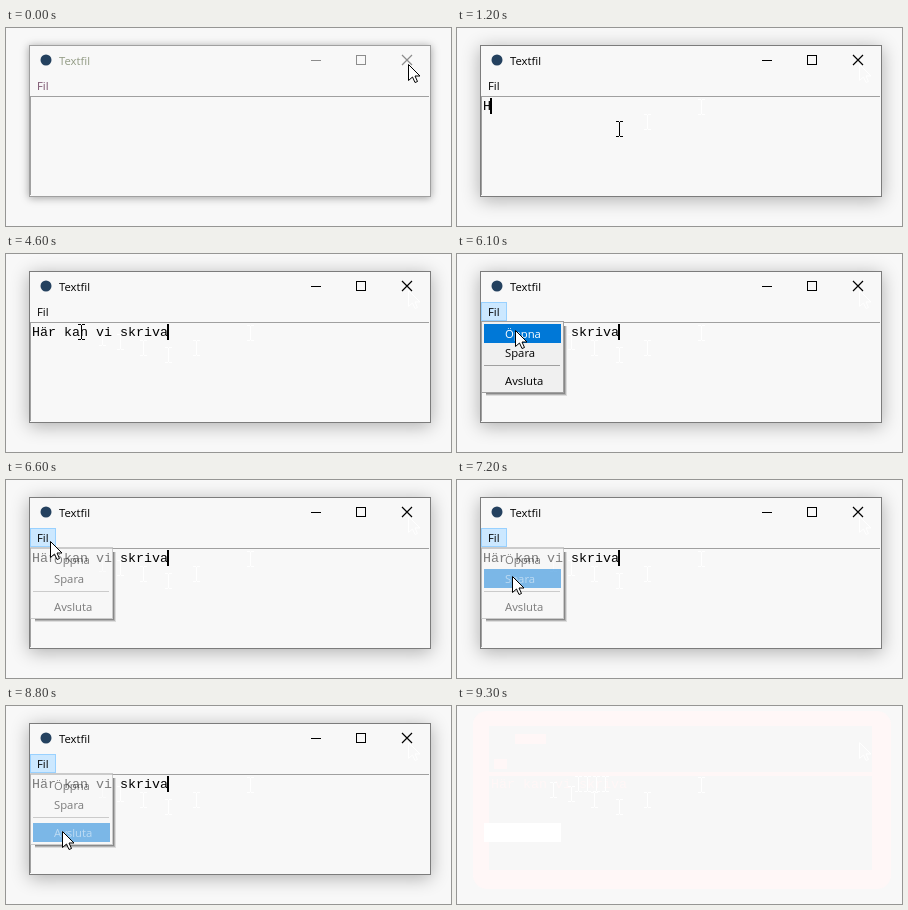
Animation of 445x198 px, one loop 9800 ms. Source, as an HTML page with a canvas:

```html
<!DOCTYPE html>
<html lang="sv">
<head>
<meta charset="utf-8">
<title>Textfil</title>
<style>
  html, body { margin: 0; width: 100%; height: 100%; overflow: hidden; background: #f8f8f8; }
  canvas { display: block; width: 445px; height: 198px; }
</style>
</head>
<body>
<canvas id="stage"></canvas>
<script>
const W = 445, H = 198, LOOP = 9800, STEP = 100;
const BG = '#f8f8f8', BLUE = '#0078d7', GREY = '#a0a0a0';
const UI = '11.3px "Open Sans", "Noto Sans", sans-serif';
const MONO = '13.33px "Courier New", "Liberation Mono", monospace';
const CELL = 8;

const TEXT = 'Här kan vi skriva';
const ITEMS = [['Öppna', 70], ['Spara', 89], ['Avsluta', 117]];

// The menu opens three times; each visit ends in a click
const VISITS = [
  { open: 5200, close: 6200 },
  { open: 6600, close: 7200 },
  { open: 7600, close: 8800 }
];
const CLOSE = 8800, GONE = 9300;

// Pointer glides: each starts where the last one ended
const FIL = { x: 45, y: 62 };
const GLIDES = [
  { from: 0, to: 400, x: 162, y: 101 },
  { from: 4100, to: 4600, x: 75, y: 78 },
  { from: 4600, to: 4900, ...FIL },
  { from: 5300, to: 5700, x: 59, y: 77 },
  { from: 6200, to: 6500, ...FIL },
  { from: 6700, to: 7000, x: 56, y: 97 },
  { from: 7200, to: 7500, ...FIL },
  { from: 7700, to: 8000, x: 51, y: 112 },
  { from: 8000, to: 8200, x: 57, y: 126 }
];

const canvas = document.getElementById('stage');
const ctx = canvas.getContext('2d');
const dpr = window.devicePixelRatio || 1;
canvas.width = W * dpr;
canvas.height = H * dpr;

const clamp = u => Math.min(1, Math.max(0, u));
const easeOut = u => 1 - (1 - u) ** 1.55;

function rect(x, y, w, h, fill) {
  ctx.fillStyle = fill;
  ctx.fillRect(x, y, w, h);
}

function frame(x, y, w, h, color) {
  ctx.strokeStyle = color;
  ctx.lineWidth = 1;
  ctx.strokeRect(x + .5, y + .5, w - 1, h - 1);
}

function label(s, x, y, color, font = UI) {
  ctx.font = font;
  ctx.fillStyle = color;
  ctx.fillText(s, x, y);
}

function pointerAt(t) {
  let x = 403, y = 37;
  for (const g of GLIDES) {
    const k = easeOut(clamp((t - g.from) / (g.to - g.from)));
    x += (g.x - x) * k;
    y += (g.y - y) * k;
  }
  return [Math.round(x), Math.round(y)];
}

// Half-transparent for one step when opening and closing
function menuAlpha(t) {
  const v = VISITS.find(v => t >= v.open && t < v.close + STEP);
  if (!v) return 0;
  return t < v.open + STEP || t >= v.close ? .5 : 1;
}

function typedCount(t) {
  const n = Math.ceil((t - 1190) / 144.3);
  return Math.min(TEXT.length, Math.max(0, n));
}

function caretOn(t) {
  const phase = (t - 1660) % 825;
  return t >= 900 && (phase < 0 || phase >= 300);
}

function arrow(x, y, fill, line) {
  const pts = [[0, 0], [0, 16], [4, 12.5], [6.5, 18], [9, 17], [6.5, 11.5], [11.5, 11.5]];
  ctx.beginPath();
  pts.forEach(([dx, dy]) => ctx.lineTo(x + dx - .5, y + dy - .5));
  ctx.closePath();
  ctx.fillStyle = fill;
  ctx.fill();
  ctx.strokeStyle = line;
  ctx.lineWidth = 1;
  ctx.stroke();
}

function beam(x, y, color) {
  rect(x, y - 7, 1, 14, color);
  for (const dy of [-8, 7]) {
    rect(x - 3, y + dy, 3, 1, color);
    rect(x + 1, y + dy, 3, 1, color);
  }
}

// Faint prints stay where the pointer has passed over the page
function drawPrints(t) {
  if (t >= STEP) arrow(403, 37, BG, '#fff');
  for (let s = 2 * STEP; s < Math.min(t, 4500); s += STEP) {
    const [x, y] = pointerAt(s);
    const [nx, ny] = pointerAt(s + STEP);
    if (x !== nx || y !== ny) beam(x, y, '#fff');
  }
}

function drawButtons(color) {
  rect(305, 32, 10, 1, color);
  frame(350, 27, 10, 10, color);
  ctx.beginPath();
  ctx.moveTo(396, 27);
  ctx.lineTo(406, 37);
  ctx.moveTo(406, 27);
  ctx.lineTo(396, 37);
  ctx.lineWidth = 1.2;
  ctx.stroke();
}

function drawWindow(t) {
  const active = t >= STEP;
  ctx.save();
  ctx.shadowColor = `rgba(0,0,0,${active ? .3 : .36})`;
  ctx.shadowBlur = (active ? 17 : 8) * dpr;
  ctx.shadowOffsetY = (active ? 3 : 1) * dpr;
  rect(23, 17, 402, 152, BG);
  ctx.restore();
  frame(23, 17, 402, 152, active ? '#7c7c7c' : GREY);

  ctx.beginPath();
  ctx.arc(40, 32, 5.5, 0, 7);
  ctx.fillStyle = '#24415f';
  ctx.fill();
  label('Textfil', 53, 37, active ? '#000' : '#929b84');
  drawButtons(active ? '#000' : '#8c8c8c');

  if (t >= 4800 && t <= CLOSE) {
    rect(24, 48, 26, 19, '#cce8ff');
    frame(24, 48, 26, 19, '#99d1ff');
  }
  label('Fil', 31, 62, active ? '#000' : '#79516c');
  rect(24, 68, 399, 1, GREY);
  rect(24, 68, 1, 99, GREY);
  drawPrints(t);

  const n = typedCount(t);
  for (let i = 0; i < n; i++) label(TEXT[i], 26 + i * CELL, 82, '#000', MONO);
  if (caretOn(t)) rect(25 + n * CELL, 70, 2, 16, '#000');
}

function drawMenu(t, y) {
  const alpha = menuAlpha(t);
  if (!alpha) return;
  for (let i = 0; i < 3; i++) {
    const shade = `rgba(0,0,0,${.45 - .17 * i})`;
    rect(107 + i, 72, 1, 68 + i, shade);
    rect(29, 139 + i, 78 + i, 1, shade);
  }
  ctx.globalAlpha = alpha;
  rect(24, 67, 83, 72, alpha < 1 ? BG : '#f0f0f0');
  frame(24, 67, 83, 72, GREY);
  const hot = ITEMS.filter(([, top]) => y >= top).length - 1;
  ITEMS.forEach(([name, top], i) => {
    if (i === hot) rect(27, top, 77, 19, BLUE);
    label(name, 48, top + 14, i === hot ? '#fff' : '#000');
  });
  rect(27, 111, 76, 1, GREY);
  ctx.globalAlpha = 1;
}

function drawPointer(t, x, y) {
  if (y > 68 && !menuAlpha(t)) beam(x, y, '#000');
  else arrow(x, y, '#fff', '#000');
}

// Pale afterimage of the closed window
function drawRemains() {
  const pink = '#fff7f7';
  ctx.beginPath();
  ctx.roundRect(16, 5, 418, 178, 14);
  ctx.fillStyle = pink;
  ctx.fill();
  rect(32, 20, 383, 144, '#f7f7f7');
  rect(32, 66, 383, 4, pink);
  rect(58, 28, 31, 10, pink);
  rect(37, 53, 13, 10, pink);
  label(TEXT, 34, 82, pink, MONO);
  for (let i = 0; i < 4; i++) beam(121 + i * 9, 78, '#fff');
  drawPrints(LOOP);
  rect(27, 117, 77, 19, '#fff');
}

function draw(t) {
  ctx.setTransform(dpr, 0, 0, dpr, 0, 0);
  rect(0, 0, W, H, BG);
  if (t >= GONE) {
    drawRemains();
    return;
  }
  const [x, y] = pointerAt(t);
  const gone = clamp((t - CLOSE) / (GONE - CLOSE));
  ctx.save();
  // The closing window shrinks a little about its centre while it fades
  const scale = 1 - .05 * gone;
  ctx.translate(224, 93);
  ctx.scale(scale, scale);
  ctx.translate(-224, -93);
  drawWindow(t);
  ctx.restore();
  drawMenu(t, y);
  if (t <= CLOSE) drawPointer(t, x, y);
  ctx.globalAlpha = easeOut(gone);
  rect(0, 0, W, H, BG);
  ctx.globalAlpha = 1;
}

const start = performance.now();
function tick() {
  const t = (performance.now() - start) % LOOP;
  draw(Math.floor(t / STEP) * STEP);
  requestAnimationFrame(tick);
}
tick();
</script>
</body>
</html>
```
